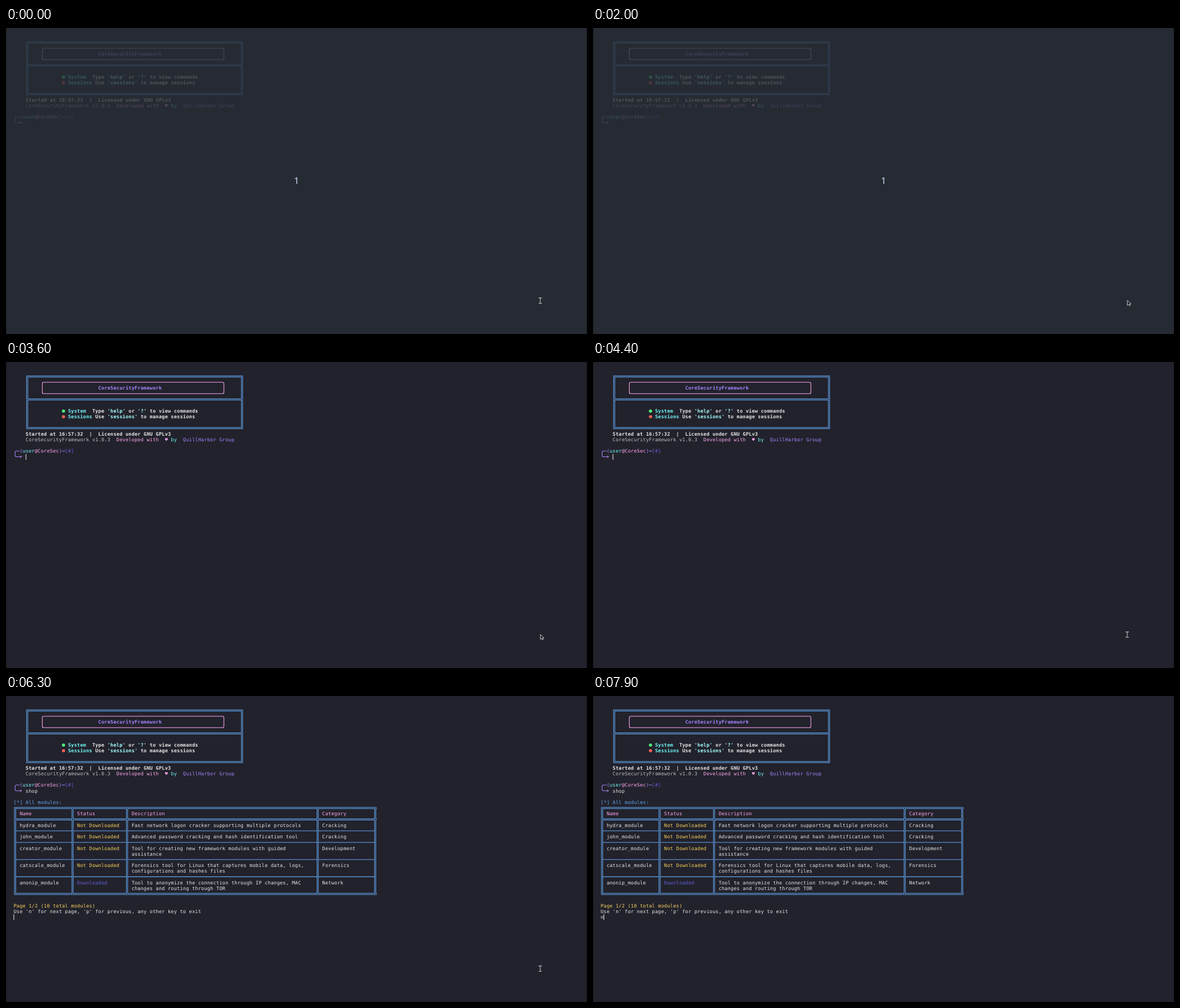
An HTML page that plays this animation: 1030 px wide and 544 px high, repeating every 8 s.

```html
<!DOCTYPE html>
<html lang="en">
<head>
<meta charset="utf-8">
<title>Terminal session</title>
<style>
html, body { margin: 0; width: 100%; height: 100%; overflow: hidden; background: #22222c; }
svg { display: block; width: 1030px; height: 544px; }
text {
  font: 16px "DejaVu Sans Mono", monospace;
  letter-spacing: .367px; /* fits glyphs to 10-unit cells */
  white-space: pre;
  text-rendering: geometricPrecision;
}
.bold { font-weight: bold; }
#count { font: 30px "Noto Sans", sans-serif; letter-spacing: 0; }
.line { fill: none; stroke-width: 2; }
</style>
</head>
<body>
<svg id="stage" viewBox="0 0 1920 1014" preserveAspectRatio="none"></svg>
<script>
const WHITE = '#e6e6e6', BLUE = '#62a6ee', PINK = '#ffa6ee', PURPLE = '#a585ff',
      CYAN = '#70f5f5', PALE = '#a4ffff', YELLOW = '#fad25a', INDIGO = '#5f5fdc',
      GRAY = '#bcbcc0';

// Terminal grid: cells of 10 x 19 units
const left = c => 25 + c * 10, top_ = r => 1 + r * 19;
const X = c => left(c) + 5, Y = r => top_(r) + 9;

const text = (r, c, color, s, bold = '') =>
  `<text x="${left(c)}" y="${top_(r) + 15}" fill="${color}" class="${bold}">${s}</text>`;
const bold = (r, c, color, s) => text(r, c, color, s, 'bold');
const path = (color, d) => `<path class="line" stroke="${color}" d="${d}"/>`;
const box = (color, c1, r1, c2, r2, inset, radius = 0) =>
  `<rect class="line" stroke="${color}" x="${X(c1) + inset}" y="${Y(r1) + inset}" rx="${radius}"
    width="${X(c2) - X(c1) - 2 * inset}" height="${Y(r2) - Y(r1) - 2 * inset}"/>`;
const dot = (r, c, color) => `<circle cx="${X(c)}" cy="${Y(r) + .5}" r="5.2" fill="${color}"/>`;

function banner() {
  return box(BLUE, 4, 2, 75, 11, -2) + box(BLUE, 4, 2, 75, 6, 2) + box(BLUE, 4, 6, 75, 11, 2)
    + box(PINK, 9, 3, 69, 5, 0, 5)
    + bold(4, 28, PURPLE, 'CoreSecurityFramework')
    + dot(8, 16, '#50fa7b') + bold(8, 18, CYAN, 'System')
    + bold(8, 26, WHITE, 'Type') + bold(8, 31, PALE, "'help'") + bold(8, 38, WHITE, 'or')
    + bold(8, 41, PALE, "'?'") + bold(8, 45, WHITE, 'to view commands')
    + dot(9, 16, '#f8605a') + bold(9, 18, CYAN, 'Sessions')
    + bold(9, 27, WHITE, 'Use') + bold(9, 31, PALE, "'sessions'")
    + bold(9, 42, WHITE, 'to manage sessions')
    + bold(12, 4, WHITE, 'Started at 16:57:32  |  Licensed under GNU GPLv3')
    + text(13, 4, GRAY, 'CoreSecurityFramework v1.0.3')
    + text(13, 34, PINK, 'Developed with') + text(13, 50, PINK, '♥')
    + text(13, 52, CYAN, 'by') + text(13, 56, PURPLE, 'QuillHarbor Group');
}

function prompt_() {
  const x = X(0), y1 = Y(15), y2 = Y(16);
  return path(PURPLE, `M${left(2)} ${y1}H${x + 5}Q${x} ${y1} ${x} ${y1 + 5}V${y2 - 5}Q${x} ${y2} ${x + 5} ${y2}H${left(2)}`)
    + `<path fill="#a878c8" d="M${left(2) + 1} ${y2 - 4}l8 4l-8 4z"/>`
    + text(15, 2, PURPLE, '(') + text(15, 3, CYAN, 'user') + text(15, 7, PINK, '@CoreSec')
    + text(15, 15, PURPLE, ')') + path(PURPLE, `M${left(16)} ${y1}H${left(17)}`)
    + text(15, 17, INDIGO, '[#]');
}

const modules = [
  [22, 'hydra', 'Cracking', 'Fast network logon cracker supporting multiple protocols'],
  [24, 'john', 'Cracking', 'Advanced password cracking and hash identification tool'],
  [26, 'creator', 'Development', 'Tool for creating new framework modules with guided', 'assistance'],
  [29, 'catscale', 'Forensics', 'Forensics tool for Linux that captures mobile data, logs,', 'configurations and hashes files'],
  [32, 'anonip', 'Network', 'Tool to anonymize the connection through IP changes, MAC', 'changes and routing through TOR']
];

function table() {
  const cols = [0, 19, 37, 100, 119], end = left(120);
  let s = text(18, 0, BLUE, '[*] All modules:');
  s += path(BLUE, `M${end} ${Y(19) - 2}H${X(0) - 2}V${Y(34) + 2}H${end}`);
  for (const [a, b] of [[19, 21], [21, 34]])
    s += path(BLUE, `M${end} ${Y(a) + 2}H${X(119) + 2}V${Y(b) - 2}H${end}`);
  ['Name', 'Status', 'Description', 'Category'].forEach((title, i) => {
    const a = cols[i], b = cols[i + 1];
    s += box(BLUE, a, 19, b, 21, 2) + box(BLUE, a, 21, b, 34, 2) + text(20, a + 2, PINK, title);
    for (const r of [23, 25, 28, 31]) s += path(BLUE, `M${X(a) + 2} ${Y(r)}H${X(b) - 2}`);
  });
  for (const [r, name, category, ...lines] of modules) {
    const owned = name === 'anonip';
    s += text(r, 2, WHITE, name + '_module') + text(r, 102, WHITE, category)
      + text(r, 21, owned ? INDIGO : YELLOW, owned ? 'Downloaded' : 'Not Downloaded');
    lines.forEach((line, i) => s += text(r + i, 39, WHITE, line));
  }
  return s + text(36, 0, YELLOW, 'Page 1/2 (10 total modules)')
    + text(37, 0, WHITE, "Use 'n' for next page, 'p' for previous, any other key to exit");
}

document.getElementById('stage').innerHTML = `
  <rect width="1920" height="1014" fill="#22222c"/>
  ${banner()}${prompt_()}
  <g id="list">${table()}</g>
  <g id="command">${text(16, 4, WHITE, '')}</g>
  <g id="key">${text(38, 0, WHITE, 'n')}</g>
  <rect id="caret" width="2" height="19" fill="${WHITE}"/>
  <g id="countdown">
    <rect width="1920" height="1014" fill="#272d35" fill-opacity=".8"/>
    <text id="count" x="960" y="516" text-anchor="middle" fill="#d3e0ff">1</text>
  </g>
  <path d="M1 0V1014M1919 0V1014" stroke="#000" stroke-opacity=".25" stroke-width="2"/>
  <path id="arrow" d="M1766 903v16l4-3.5 3 5.5 2.5-1.5-2.5-5h5z" fill="#1c1c24" stroke="#f0f0f0" stroke-width="1.5"/>
  <path id="beam" class="line" stroke="#c4c4c8" d="M1760 894.5h4.5l1 1 1-1h4.5M1765.5 895v17M1760 912.5h4.5l1-1 1 1h4.5"/>`;

const $ = id => document.getElementById(id);
const show = (id, on) => $(id).style.display = on ? '' : 'none';
const typed = $('command').firstChild;
const toggles = [500, 1000, 1500, 2000, 2500, 3000, 3500, 4000, 4300, 5200, 5500, 6800, 7300, 7800, 7900];

function draw() {
  const t = performance.now() % 8000;
  const letters = Math.max(0, Math.min(4, Math.floor((t - 5500) / 100)));
  const listed = t >= 6300, keyed = t >= 7900;
  typed.textContent = 'shop'.slice(0, letters);
  show('countdown', t < 3600);
  show('list', listed);
  show('key', keyed);

  show('caret', toggles.filter(x => x <= t).length % 2);
  $('caret').setAttribute('x', left(listed ? +keyed : 4 + letters));
  $('caret').setAttribute('y', top_(listed ? 38 : 16));

  const arrow = t >= 100 && t < 4400;
  show('arrow', arrow);
  show('beam', !arrow && t < 7700);
  $('arrow').setAttribute('transform', `translate(${t >= 4200 ? 4 : 0})`);
  requestAnimationFrame(draw);
}
draw();
</script>
</body>
</html>
```
